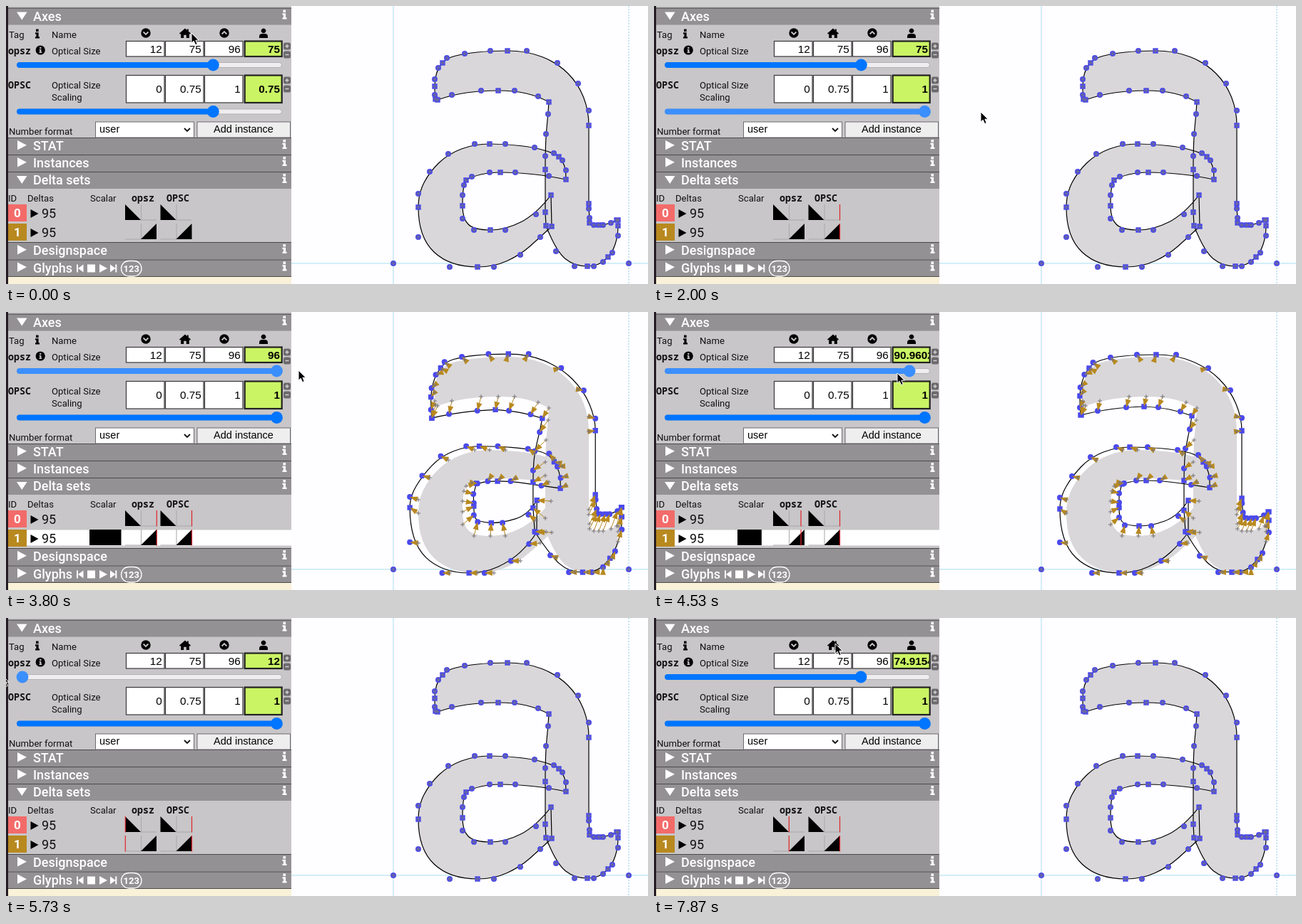
These frames come from a looping animation (900x391 px, 7.94 s). An HTML page:

```html
<!DOCTYPE html>
<html lang="en">
<head>
<meta charset="utf-8">
<title>Variable font axes</title>
<style>
html, body { margin: 0; width: 100%; height: 100%; overflow: hidden; background: #fefdff; }
svg { display: block; }
text { font: 13.1px Roboto, sans-serif; fill: #111; }
.head { font-size: 18px; font-weight: 500; fill: #fff; }
.mono { font: bold 13.3px "Noto Sans Mono", monospace; }
.num { font: 15.3px "Liberation Sans", Arial, sans-serif; fill: #000; }
.ui { font: 14.5px "Liberation Sans", Arial, sans-serif; fill: #000; }
.bold { font-weight: bold; }
.end { text-anchor: end; }
.mid { text-anchor: middle; }
.id { font-size: 17px; font-weight: 700; fill: #fff; }
.line { fill: none; stroke: #000; stroke-width: 1.2; }
</style>
</head>
<body>
<svg id="stage" width="900" height="391" viewBox="0 0 900 391">
  <defs>
    <path id="info" d="M-2-6.5h3.6v3.4h-3.6zM-3-1.8h4.6v6h1.4v2.3h-6v-2.3h1.4v-3.7h-1.4z"/>
    <clipPath id="cellClip"><rect x="336" y="49" width="49.5" height="90"/></clipPath>
  </defs>
  <g id="panel"></g>
  <g id="marks"></g>
  <g id="sliders"></g>
  <g id="glyph">
    <path d="M543 0V391M400 362H900" stroke="#a5dff0"/>
    <path d="M873 0V391" stroke="#8ccfe8" stroke-dasharray="2 2"/>
    <path id="fill" fill="#d9d7d9"/>
    <path id="outline" class="line"/>
    <path id="shafts" stroke="#b8891f" fill="none"/>
    <path id="dots" fill="#4a49ec"/>
    <path id="heads" fill="#b8891f"/>
    <path id="crosses" stroke="#77757a" fill="none"/>
  </g>
  <path id="cursor" d="M0 0V14.2L3.2 11.2L5.6 16.6L8.2 15.5L5.9 10.2H10.2Z" fill="#000" stroke="#fff" stroke-width="1"/>
</svg>
<script>
const $ = id => document.getElementById(id);
const LOOP = 7940, FRAME = 1000 / 15;
const BLUE = '#0075ff', ACTIVE = '#3b8ffc', HOVER = '#0a5cc4';

// ---------- static panel ----------
const rect = (x, y, w, h, fill, extra = '') =>
  `<rect x="${x}" y="${y}" width="${w}" height="${h}" fill="${fill}" ${extra}/>`;
const text = (x, y, s, cls = '') => `<text x="${x}" y="${y}" class="${cls}">${s}</text>`;
const path = (d, fill = '#000', extra = '') => `<path d="${d}" fill="${fill}" ${extra}/>`;
const info = (x, y, fill) => `<use href="#info" x="${x}" y="${y}" fill="${fill}"/>`;

function header(y, name, open) {
  const tri = open ? `M15 ${y + 6}h14.5l-7.2 11z` : `M16 ${y + 4}l13 6.8l-13 6.8z`;
  return rect(3, y, 397, 24, '#949194') + rect(3, y, 397, 1, '#4c494c') + path(tri, '#fff') +
    text(38, y + 18, name, 'head') + info(390.5, y + 9.5, '#fff');
}

function chevron(x, dir) {
  return `<circle cx="${x}" cy="38" r="6.7"/>` +
    path(`M${x - 3.4} ${38 - 1.5 * dir}l3.4 ${3.4 * dir}l3.4 ${-3.4 * dir}`, 'none', 'stroke="#c8c6c8" stroke-width="1.8"');
}

function axisRow(y, h, values) {
  const cells = values.map((v, i) => {
    const x = 168.5 + i * 55;
    return rect(x, y, 53.5, h, '#fff', 'stroke="#3a383a" stroke-width="1.2"') +
      text(x + 50.2, y + h / 2 + 5.5, v, 'num end');
  }).join('');
  const user = rect(334.7, y, 52, h, '#cbf465', 'stroke="#222" stroke-width="2.2"');
  const step = ['M391.5 0h5M394 -2.5v5', 'M391.5 0h5'].map((d, i) => {
    const cy = y + 7 + i * 12;
    return rect(389, cy - 5, 10, 10, '#6c6a6c', 'rx="2.5"') +
      `<path transform="translate(0 ${cy})" d="${d}" stroke="#d5d3d5" stroke-width="1.4"/>`;
  }).join('');
  return cells + user + step;
}

function deltaRow(y, id, color, dir) {
  const boxes = [189, 238.5].map(x =>
    path(`M${x + .5} ${y}v22M${x} ${y + 22}h${-22 * dir}`, 'none', 'stroke="#a9a7a9"') +
    path(`M${x} ${y + 22}h${22 * dir}v-22z`)).join('');
  return rect(3, y, 26, 24, color) + text(16, y + 18, id, 'id mid') +
    path(`M34.5 ${y + 7}l11 6l-11 6z`) + `<text x="50" y="${y + 19}" style="font-size:18px">95</text>` + boxes;
}

$('panel').innerHTML =
  rect(0, 0, 400, 391, '#c8c6c8') + rect(3, 381, 397, 10, '#f9f1d8') +
  header(2.5, 'Axes', true) + header(185, 'STAT') + header(209, 'Instances') +
  header(233, 'Delta sets', true) + header(332, 'Designspace') + header(356.5, 'Glyphs') +
  rect(3, 380, 397, 1, '#4c494c') + rect(0, 0, 3, 391, '#261c24') +
  text(4, 45, 'Tag') + info(44, 39, '#000') + text(64, 45, 'Name') +
  chevron(196, 1) + chevron(306, -1) +
  path('M243 38.6L251 31.6l2.8 2.4v-1.6h2v3.3l3.2 2.9l-1 1.2l-1.2-1v6.2h-4v-4.3h-3.6v4.3h-4v-6.2l-1.2 1z') +
  path('M361 31.5a3.4 3.4 0 1 1-.01 0zM355 45v-2a4 4 0 0 1 4-4h4a4 4 0 0 1 4 4v2z') +
  text(3, 68, 'opsz', 'mono') + '<circle cx="48.2" cy="62" r="6.6"/>' +
  `<use href="#info" transform="translate(48.4 62) scale(.62)" fill="#c8c6c8"/>` +
  text(64, 68, 'Optical Size') + axisRow(49.5, 21.5, ['12', '75', '96']) +
  text(3, 115.5, 'OPSC', 'mono') + text(64, 115.5, 'Optical Size') + text(64, 133, 'Scaling') +
  axisRow(97.5, 38.5, ['0', '0.75', '1']) +
  text(4, 181, 'Number format') +
  rect(125.5, 163, 138, 22, '#fff', 'stroke="#6e6c6e"') + text(131, 178, 'user', 'ui') +
  path('M250 172l4 4l4-4', 'none', 'stroke="#111" stroke-width="1.8"') +
  rect(268, 163, 130.5, 22, '#efeeef', 'stroke="#6e6c6e"') + text(333, 178, 'Add instance', 'ui mid') +
  text(3, 275, 'ID') + text(30, 275, 'Deltas') + text(118, 275, 'Scalar') +
  text(176, 275, 'opsz', 'mono') + text(225, 275, 'OPSC', 'mono') +
  rect(29, 306.5, 371, 22, '#fff', 'id="hot"') +
  deltaRow(279, 0, '#f36b69', -1) + deltaRow(306, 1, '#b8891f', 1) +
  rect(117, 306, 0, 22, '#000', 'id="bar"') +
  path('M99 363.5h2v11h-2zM108.5 363.5v11l-7.5-5.5zM114 363.5h11v11h-11zM131 363l11 6l-11 6zM146 363.5l7.5 5.5l-7.5 5.5zM153.3 363.5h2v11h-2z', '#fff') +
  rect(161.5, 358.5, 28.5, 21.5, 'none', 'rx="10.7" stroke="#fff" stroke-width="1.3"') +
  '<text x="175.8" y="374" class="mid" style="font-size:13px;font-weight:600;fill:#fff">123</text>';

$('marks').innerHTML =
  '<path id="redA" stroke="#e0252b" stroke-width="1.2"/><path id="redB" stroke="#e0252b" stroke-width="1.2"/>' +
  '<g clip-path="url(#cellClip)">' + text(384, 65.6, '', 'num bold') + text(384, 122.2, '', 'num bold') + '</g>';
const valueTexts = $('marks').querySelectorAll('text');

$('sliders').innerHTML = [83, 148.5].map(y =>
  rect(15.5, y - 3.5, 371, 7, '#efedef', 'rx="3.5" stroke="#b3b1b3"') +
  rect(15, y - 4, 0, 8, BLUE, 'rx="4"') + `<circle cy="${y}" r="8.4"/>`).join('');
const bars = $('sliders').querySelectorAll('rect:nth-of-type(even)');
const knobs = $('sliders').querySelectorAll('circle');

// ---------- glyph: s = on curve, c = control; x,y and optionally dx,dy ----------
const REACH = .76;
const arch = `s605,132,-6,13 s602,131,-4,14 c601,125 s601,113,-4,5 c601,103 c606,87 s612,80,-2,-1 c618,73
  c643,67,-3,-3 c679,63,-2,-3 s703,63,1,-3 c730,63,2,-3 c773,80,4,-1 c802,109,6,1 c817,147,7,2 s817,168,7,-1`;
const foot = `s817,278,7,-16 c817,285 c818,298 s818,305,8,-16 c824,308,7,-18 s831,308 c837,308,7,-18 c848,305,7,-19
  s856,301,5,-20 s858,301,4,-20 s858,309,4,-16 c858,323,4,-13 c850,347,3,-8 s844,353,2,-5 c837,360,0,-1
  c824,366,-2,0 s815,366,-5,0 c797,366,-6,0 c771,345,-6,-2`;
const stem = `s757,309,-12,0 s756,290,-13,-11 s756,230,-13,7 c756,211,-13,9 c757,180,-12,12 c760,152,-9,13
  s761,135,-7,11 c746,127,-8,13 c713,119,-6,15 s690,119,-3,14 c666,119,-4,15 c625,125,-3,14`;
const bowl = `s678,194,-11,-4 c700,194,-8,-4 c741,199,-7,-5 c768,207,-5,-6 s775,212,-5,-1 c780,217 c785,231
  s785,244,-6,3 c761,239,-8,4 c714,234,-5,3 s693,234,-3,3 c678,234,-2,3 c653,240,6,1 s645,245,11,-3 c642,252,10,3
  c640,266,12,2 s640,281,12,-6 c640,299,12,-10 c656,315,4,-15 s679,315,1,-14 c700,315,-3,-14 c743,293,-8,-6
  s764,266,-15,-1 s765,310,-16,0`;
const belly = `c749,325,-12,1 c721,350,-10,0 c684,367,-10,0 s661,367,-9,0 c622,367,-8,0 c578,325,-9,-1 s578,283,-9,-6
  c578,264,-9,-3 c594,233,-8,-2 c620,208,-8,-4 c657,194,-9,-4`;

function parse(src) {
  const pts = src.trim().split(/\s+/).map(w => {
    const [x, y, dx, dy] = w.slice(1).split(',').map(Number);
    return { on: w[0] === 's', x, y, dx, dy };
  });
  // points without a delta take it from their neighbours
  pts.forEach((p, i) => {
    if (p.dx !== undefined) return;
    const a = pts[i - 1], b = pts.slice(i).find(q => q.dx !== undefined);
    const k = 1 / (pts.indexOf(b) - i + 1);
    p.dx = a.dx + (b.dx - a.dx) * k;
    p.dy = a.dy + (b.dy - a.dy) * k;
  });
  return pts;
}
const contours = [parse([arch, foot, stem].join(' ')), parse([bowl, belly].join(' '))];
const points = contours.flat();
const phantoms = [{ x: 543, y: 362 }, { x: 873, y: 362 }];

const move = (p, s) => ({ on: p.on, x: p.x + p.dx * s / REACH, y: p.y + p.dy * s / REACH });
const r2 = n => n.toFixed(2);
const at = p => r2(p.x) + ' ' + r2(p.y);

// quadratic outline with implied midpoints between controls
function contourPath(pts) {
  let d = 'M' + at(pts[0]);
  pts.forEach((p, i) => {
    const n = pts[(i + 1) % pts.length];
    if (p.on) { if (n.on) d += 'L' + at(n); return; }
    d += `Q${at(p)} ` + at(n.on ? n : { x: (p.x + n.x) / 2, y: (p.y + n.y) / 2 });
  });
  return d + 'Z';
}
const shape = s => contours.map(c => contourPath(c.map(p => move(p, s)))).join('');

const dot = p => p.on
  ? `M${r2(p.x - 3.7)} ${r2(p.y - 3.7)}h7.4v7.4h-7.4z`
  : `M${r2(p.x - 4)} ${r2(p.y)}a4 4 0 1 1 8 0a4 4 0 1 1-8 0z`;
const cross = p => `M${p.x - 3} ${p.y}h6M${p.x} ${p.y - 3}v6`;

function arrowHead(p, tip) {
  const len = Math.hypot(p.dx, p.dy) || 1, ux = p.dx / len, uy = p.dy / len;
  const bx = tip.x - ux * 11, by = tip.y - uy * 11;
  return `M${at(tip)}L${r2(bx - uy * 4)} ${r2(by + ux * 4)}L${r2(bx + uy * 4)} ${r2(by - ux * 4)}Z`;
}

function drawGlyph(s) {
  const now = points.map(p => move(p, s));
  $('outline').setAttribute('d', shape(s));
  $('dots').setAttribute('d', now.concat(phantoms).map(dot).join(''));
  $('heads').setAttribute('d', s > 0 ? points.map((p, i) => arrowHead(p, now[i])).join('') : '');
  $('shafts').setAttribute('d', s > 0 ? points.map((p, i) => `M${at(p)}L${at(now[i])}`).join('') : '');
}
$('fill').setAttribute('d', shape(0));
$('crosses').setAttribute('d', points.concat(phantoms).map(cross).join(''));

// ---------- motion ----------
// smooth monotone curve through [time, value] keys
function track(keys) {
  const slope = i => (keys[i + 1][1] - keys[i][1]) / (keys[i + 1][0] - keys[i][0]);
  const tan = keys.map((k, i) => {
    if (!i || i === keys.length - 1) return 0;
    const a = slope(i - 1), b = slope(i);
    return a * b > 0 ? 2 * a * b / (a + b) : 0;
  });
  return t => {
    let i = 0;
    while (i < keys.length - 2 && t >= keys[i + 1][0]) i++;
    const [t0, a] = keys[i], [t1, b] = keys[i + 1], h = t1 - t0;
    const u = Math.min(1, Math.max(0, (t - t0) / h)), v = 1 - u;
    return v * v * (1 + 2 * u) * a + u * u * (3 - 2 * u) * b + h * u * v * (v * tan[i] - u * tan[i + 1]);
  };
}
const BACK = 68 * FRAME;
const opszAt = track([[3260, 75], [3400, 76.93137], [3800, 96], [4330, 96], [BACK, 90.96023], [5250, 12], [5950, 12], [6750, 74.91542], [LOOP, 74.91542]]);
const opscAt = track([[870, .75], [1450, 1], [LOOP, 1]]);
const cursorX = track([[0, 260], [600, 289], [800, 289], [1350, 379], [1900, 458], [2070, 458], [2900, 291], [3180, 291], [3400, 320], [3780, 410], [4200, 410], [BACK, 341], [5180, 23], [5600, -6], [5780, -6], [6050, 50], [6700, 284], [7100, 284], [7700, 254], [LOOP, 254]]);
const cursorY = track([[0, 38], [600, 146], [1900, 149], [2070, 149], [2900, 80.5], [3400, 80.5], [BACK, 86], [5733, 80], [6700, 82], [7100, 82], [7700, 36], [LOOP, 36]]);

function setSlider(i, k, t, mx, my) {
  const [from, to] = [[3180, 6820], [800, 2070]][i];
  const busy = (t >= 800 && t < 2070) || (t >= 3180 && t < 6820);
  const over = !busy && mx > 15 && mx < 387 && Math.abs(my - [83, 148.5][i]) < 8;
  const color = t >= from && t < to ? ACTIVE : over ? HOVER : BLUE;
  const x = 23 + 356.5 * k;
  bars[i].setAttribute('width', x - 15);
  bars[i].setAttribute('fill', color);
  knobs[i].setAttribute('cx', x);
  knobs[i].setAttribute('fill', color);
}

function setValue(i, v) {
  const s = String(+v.toFixed(6)), long = s.length > 5, el = valueTexts[i];
  el.textContent = s;
  el.setAttribute('x', long ? 336.5 : 384);
  el.style.textAnchor = long ? 'start' : 'end';
}

const redLine = (id, x, n) =>
  $(id).setAttribute('d', n ? `M${x + 22 * n} 279v22.5M${x + 22 * n} 306v22.5` : '');

function draw(t) {
  const opsz = opszAt(t), opsc = opscAt(t), mx = cursorX(t), my = cursorY(t);
  const nA = opsz >= 75 ? (opsz - 75) / 21 : (opsz - 75) / 63;
  const nB = (opsc - .75) / .25;
  const scalar = Math.max(0, nA) * Math.max(0, nB);
  setSlider(0, (opsz - 12) / 84, t, mx, my);
  setSlider(1, opsc, t, mx, my);
  setValue(0, opsz);
  setValue(1, opsc);
  redLine('redA', 189.3, nA);
  redLine('redB', 238.5, nB);
  $('hot').style.display = scalar > 0 ? '' : 'none';
  $('bar').setAttribute('width', 44.5 * scalar);
  drawGlyph(scalar);
  $('cursor').setAttribute('transform', `translate(${r2(mx)} ${r2(my)})`);
}

const start = performance.now();
let last = -1;
function tick() {
  const t = (performance.now() - start) % LOOP;
  const frame = Math.floor((t + 4) / FRAME);
  if (frame !== last) draw(Math.min(LOOP, (last = frame) * FRAME));
  requestAnimationFrame(tick);
}
tick();
</script>
</body>
</html>
```
